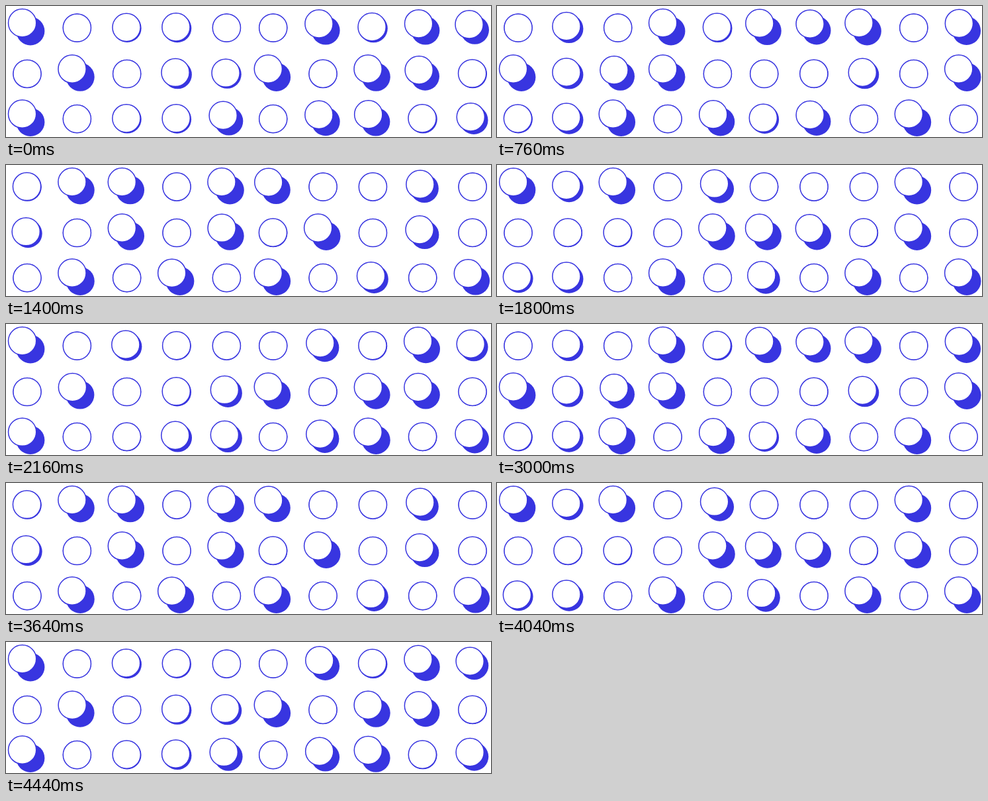
Recreate the animation shown at these times as an HTML page with a canvas. Size 733 by 198 pixels, loop 4480 ms.

```html
<!DOCTYPE html>
<html lang="en">
<head>
<meta charset="utf-8">
<title>Shifting discs</title>
<style>
html, body { margin: 0; width: 100%; height: 100%; overflow: hidden; background: #fff; }
canvas { display: block; }
</style>
</head>
<body>
<canvas width="733" height="198"></canvas>
<script>
const ctx = document.querySelector('canvas').getContext('2d');
const PERIOD = 2240, STEP = 40, BLUE = '#3835e0';
const rowY = [33, 102.5, 170.6];

// Moment (ms) at which each disc pair is furthest apart
const peaks = [
  [2050, 1282, 1612, 588, 1365, 1085, 377, 575, 1868, 424],
  [850, 238, 1156, 538, 1662, 2085, 1460, 225, 1838, 648],
  [120, 1280, 615, 1632, 418, 1333, 373, 1903, 620, 1735]
];

const colX = col => 32 + 75.35 * col - (col > 4 ? 5 : 0);

// Steep periodic pulse: 1 at the peak, 0 half a period away
function spread(t, peak) {
  const k = Math.abs(Math.tan(Math.PI * (t - peak) / PERIOD)) / 0.78;
  return 1 / (1 + k ** 5.3);
}

function disc(x, y, r) {
  ctx.beginPath();
  ctx.arc(x, y, r, 0, 2 * Math.PI);
}

function draw(t) {
  ctx.clearRect(0, 0, 733, 198);
  ctx.strokeStyle = BLUE;
  ctx.lineWidth = 1.5;
  peaks.forEach((row, r) => row.forEach((peak, c) => {
    const s = spread(t, peak), x = colX(c), y = rowY[r];
    disc(x + 4.9 * s, y + 4.9 * s, 21.5);
    ctx.fillStyle = BLUE;
    ctx.fill();
    disc(x - 7.4 * s, y - 7.4 * s, 21.1);
    ctx.fillStyle = '#fff';
    ctx.fill();
    ctx.stroke();
  }));
}

const start = performance.now();
function tick() {
  const t = (performance.now() - start) % PERIOD;
  draw(Math.floor(t / STEP) * STEP);
  requestAnimationFrame(tick);
}
tick();
</script>
</body>
</html>
```
